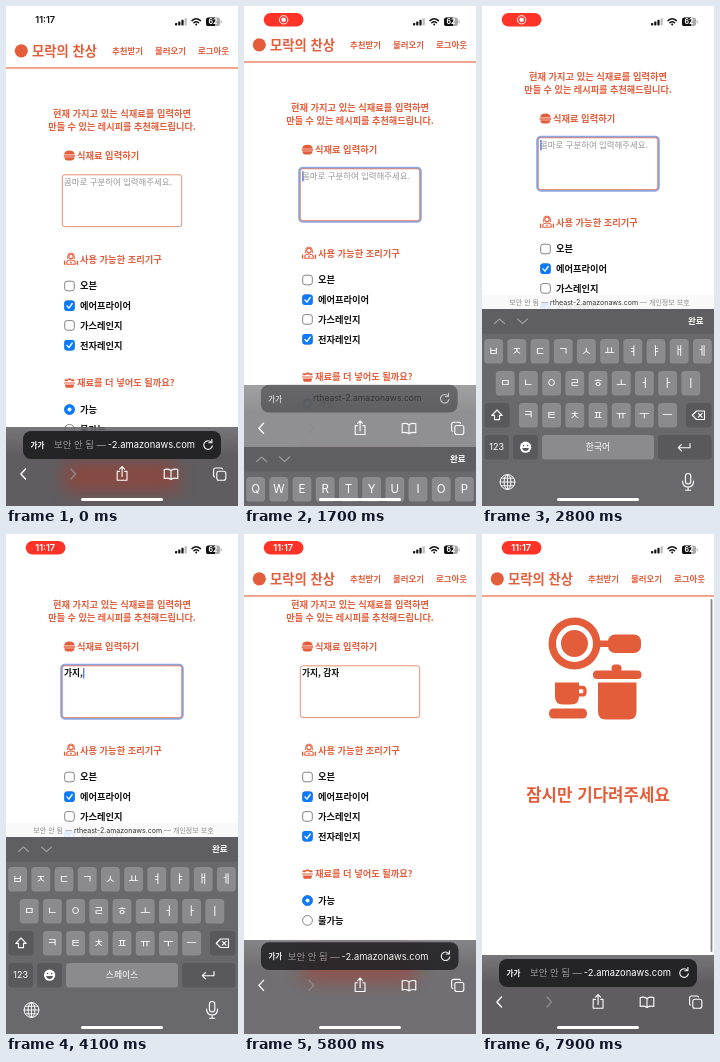
Write an HTML page that moves like this. It is 232 px wide and 500 px high and loops after 8 s.

```html
<!DOCTYPE html>
<html lang="ko">
<head>
<meta charset="utf-8">
<title>Recipe app</title>
<style>
  html, body { margin: 0; width: 100%; height: 100%; overflow: hidden; background: #fff; }
  svg { display: block; width: 232px; height: 500px; }
  text { font-family: "Noto Sans CJK KR", "Noto Sans CJK", sans-serif; white-space: pre; }
  .ui { font-family: Inter, "Noto Sans CJK KR", "Noto Sans CJK", sans-serif; }
</style>
</head>
<body>
<svg id="stage" viewBox="0 0 232 500" xmlns="http://www.w3.org/2000/svg"></svg>
<script>
const LOOP = 8000;
const ORANGE = '#e45d3b', BLUE = '#0a7aff';

// Markup helpers; text is placed by its vertical centre.
const text = (s, x, y, size, fill, extra = '') =>
  `<text x="${x}" y="${y + size * 0.36}" font-size="${size}" fill="${fill}" ${extra}>${s}</text>`;
const rect = (x, y, w, h, r, fill, extra = '') =>
  `<rect x="${x}" y="${y}" width="${w}" height="${h}" rx="${r}" fill="${fill}" ${extra}/>`;
const circle = (x, y, r, fill, extra = '') =>
  `<circle cx="${x}" cy="${y}" r="${r}" fill="${fill}" ${extra}/>`;
const line = (d, color, width = 1, extra = '') =>
  `<path d="${d}" fill="none" stroke="${color}" stroke-width="${width}" stroke-linecap="round" stroke-linejoin="round" ${extra}/>`;
const shape = (d, fill) => `<path d="${d}" fill="${fill}"/>`;
const group = (id, body, extra = '') => `<g id="${id}" ${extra}>${body}</g>`;
const BOLD = 'font-weight="700"', BLACK = 'font-weight="900"';
const MID = 'text-anchor="middle"', UI = 'class="ui"';

function statusBar() {
  const bars = [0, 1, 2, 3].map(i =>
    rect(169 + i * 3.2, 17 - i * 1.6, 2.2, 2.4 + i * 1.6, 0.6, i < 3 ? '#111' : '#bbb')).join('');
  const wifi = line('M186 14.6q4.2-3.8 8.4 0', '#111', 1.5) +
    line('M187.8 16.8q2.4-2 4.8 0', '#111', 1.4) + circle(190.2, 18.6, 1, '#111');
  const battery = rect(200, 11.5, 14, 8.5, 2.6, '#a9a9ab') +
    shape('M202.6 11.5h6.4v8.5h-6.4a2.6 2.6 0 0 1-2.6-2.6v-3.3a2.6 2.6 0 0 1 2.6-2.6z', '#111') +
    rect(214.6, 14.3, 1, 3, 0.5, '#a9a9ab') +
    text('62', 207, 15.8, 7, '#fff', `${BOLD} ${MID} ${UI}`);
  const rec = circle(39.6, 13.8, 4.2, 'none', 'stroke="#fff" stroke-width="1"') + circle(39.6, 13.8, 2.3, '#fff');
  return bars + wifi + battery +
    group('pill', rect(-19.9, -6.8, 39.8, 13.6, 6.8, '#ff3327')) +
    group('rec', rec) + text('11:17', 39.2, 14.1, 9.2, '#111', `id="clock" ${MID} ${UI} font-weight="600"`);
}

function header() {
  const nav = ['추천받기', '불러오기', '로그아웃'].map((s, i) =>
    text(s, 106 + i * 43, 44.5, 8.45, ORANGE, BOLD)).join('');
  return rect(0, 0, 232, 62, 0, '#fff') + circle(15.3, 44.8, 6.6, ORANGE) +
    text('모락의 찬상', 26, 45, 13.3, ORANGE, BLACK) + nav + rect(0, 61.4, 232, 1.1, 0, ORANGE);
}

const bowlIcon = shape('M58 148.6q.6-4 5.4-4t5.4 4z', ORANGE) + rect(57.5, 149.2, 11.8, 1.5, 0.7, ORANGE) +
  shape('M58.3 151.2h10.2q-.6 3.2-3 3.2h-4.2q-2.4 0-3-3.2z', ORANGE);
const cookIcon = circle(65, 250.4, 2.2, 'none', `stroke="${ORANGE}" stroke-width="1.1"`) +
  line('M61.6 252.8v-2.4a3.4 3.4 0 0 1 6.8 0v2.4', ORANGE, 0.9) +
  line('M60.8 258.2v-1.8q.4-2.4 4.2-2.4t4.2 2.4v1.8z', ORANGE, 1.1) +
  line('M58.6 258.2v-3M71.4 258.2v-3', ORANGE, 1.4) + circle(65, 256.4, 0.9, ORANGE);
const basketIcon = line('M59.5 374.2h1.6M62.7 373.4h1.8M66 374.2h1.6', ORANGE, 1.9) +
  line('M58.4 377h10.2', ORANGE, 1.1) + shape('M58.8 378.5h9.4l-1 3.2h-7.4z', ORANGE);

function option(label, y, id, radio) {
  const box = radio ? circle(63.5, y, 4.9, '#fff', 'stroke="#777" stroke-width=".9"')
    : rect(58.7, y - 4.8, 9.6, 9.6, 2.4, '#fff', 'stroke="#777" stroke-width=".9"');
  const on = radio ? circle(63.5, y, 5.3, BLUE) + circle(63.5, y, 2, '#fff')
    : rect(58.3, y - 5.2, 10.4, 10.4, 2.6, BLUE) + line(`M61 ${y + 0.2}l1.9 2.2 3.3-4.6`, '#fff', 1.4);
  return box + (id ? group(id, on) : '') + text(label, 74, y, 9.25, '#111', BLACK);
}

function form() {
  const title = (s, x, y) => text(s, x, y, 9.25, ORANGE, BOLD);
  return text('현재 가지고 있는 식재료를 입력하면', 116, 108, 9.25, ORANGE, `${BOLD} ${MID}`) +
    text('만들 수 있는 레시피를 추천해드립니다.', 116, 121, 9.15, ORANGE, `${BOLD} ${MID}`) +
    bowlIcon + title('식재료 입력하기', 71, 150) +
    rect(55.3, 167.8, 121.4, 53.8, 3.5, 'none', 'id="ring" stroke="#8aa9e2" stroke-width="2.2"') +
    rect(56.3, 168.8, 119.4, 51.8, 2.5, '#fff', `stroke="${ORANGE}" stroke-width=".7"`) +
    text('콤마로 구분하여 입력해주세요.', 58, 176, 8.45, '#999', 'id="hint" font-weight="500"') +
    text('', 58, 176, 8.7, '#111', `id="typed" ${BOLD}`) +
    rect(0, 171, 1.2, 10.5, 0.6, '#3d6fd8', 'id="caret"') +
    cookIcon + title('사용 가능한 조리기구', 74, 254) +
    option('오븐', 280) + option('에어프라이어', 299.7, 'check1') +
    option('가스레인지', 319.4) + option('전자레인지', 339.2, 'check2') +
    basketIcon + title('재료를 더 넣어도 될까요?', 71, 377) +
    option('가능', 403.5, 'radio', true) + option('불가능', 423.4, '', true) +
    rect(58, 456, 115.5, 30, 2.5, ORANGE) + text('추천받기', 116, 469, 9.25, '#fff', `${BOLD} ${MID}`);
}

function waiting() {
  const pan = circle(92.5, 109.5, 26, ORANGE) + circle(92.5, 109.5, 16, ORANGE, 'stroke="#fff" stroke-width="5"') +
    rect(114, 106.5, 18, 6.5, 1, ORANGE) + rect(126, 100.5, 33, 18.5, 7, ORANGE);
  const cup = shape('M73 148.5h24v14q0 8-8 8h-8q-8 0-8-8z', ORANGE) +
    line('M97 153.5h3.4q2.6 0 2.6 3v1.4q0 3-2.6 3H97', ORANGE, 3.4) + rect(67, 174.5, 38, 10, 4.5, ORANGE);
  const pot = rect(129.5, 130.5, 10, 8, 3.5, ORANGE) + rect(111, 136.5, 48.5, 8.5, 4, ORANGE) +
    shape('M116 148.5h38.5v29q0 8-8 8H124q-8 0-8-8z', ORANGE);
  return rect(0, 62, 232, 360, 0, '#fff') + pan + cup + pot +
    text('잠시만 기다려주세요', 116, 261, 16.8, ORANGE, `${BOLD} ${MID}`);
}

// Toolbar parts are drawn around their own origin.
const pillBar = () =>
  rect(17, -14, 198, 28, 8, '#242326') +
  text('가가', 24.5, 0.3, 7.5, '#fff', BOLD) +
  group('address', text('보안 안 됨 —', 48, 0, 9.4, '#9b9a9e', UI) +
    text('-2.amazonaws.com', 189, 0, 9.4, '#fff', `${UI} text-anchor="end"`)) +
  line('M205.4-2.6a4.3 4.3 0 1 0 .9 3.4', '#fff', 1.1) + line('M205.9-5.4v3.2h-3.2', '#fff', 1.1);

const buttons = () =>
  line('M19.5-5l-4.6 5 4.6 5', '#fff', 1.4) + line('M65-5l4.6 5L65 5', '#8c8a8f', 1.4) +
  line('M113.4-2.6h-2.2v8.8h9.8v-8.8h-2.2M116.1 2.4v-9.6M113.6-4.8l2.5-2.6 2.5 2.6', '#fff', 1.1) +
  line('M165 5.5q-3-2-6.8-1v-9q3.8-1 6.8 1 3-2 6.8-1v9q-3.8-1-6.8 1v-9', '#fff', 1.1) +
  rect(210.8, -2.8, 9, 9, 2, 'none', 'stroke="#fff" stroke-width="1.1"') +
  line('M208.6 3q-1-.3-1-1.6v-5.4q0-2 2-2h5.2q1.4 0 1.7 1', '#fff', 1.1);

// The bare address rides along while the pill dissolves; its captions follow.
const strip = () =>
  text('보안 안 됨 —', -50, 0, 7, '#8d8d91', `${UI} text-anchor="end" class="caption"`) +
  text('rtheast-2.amazonaws.com', -4, 0, 7, '#333', `${UI} ${MID}`) +
  text('— 개인정보 보호', 42, 0, 7, '#8d8d91', UI);

const KEY = '#8b8a8e', FN = '#59585c';
function keyRow(chars, y, pitch = 23.2, w = 18.9) {
  return [...chars].map((c, i, all) => {
    const x = 116 + (i - (all.length - 1) / 2) * pitch;
    const label = c === '&' ? '&amp;' : c;
    return rect(x - w / 2, y, w, 24.5, 3.6, KEY) + text(label, x, y + 12, 11.5, '#fff', `${MID} ${UI}`);
  }).join('');
}

function keyboard() {
  const layer = (id, a, b, c, wide) =>
    group(id, keyRow(a, 333) + keyRow(b, 365) + (wide ? keyRow(c, 397, 32.5, 28) : keyRow(c, 397)));
  const fn = (x, y, w) => rect(x, y, w, 24.5, 3.6, FN);
  const face = circle(43.6, 441.2, 5.6, '#fff') + circle(41.6, 439.6, 0.8, FN) + circle(45.6, 439.6, 0.8, FN) +
    shape('M40.2 442h6.8q-.6 3-3.4 3t-3.4-3z', FN);
  const globe = circle(25.5, 476, 7.4, 'none', 'stroke="#fff"') +
    '<ellipse cx="25.5" cy="476" rx="3.4" ry="7.4" fill="none" stroke="#fff"/>' +
    line('M18.1 476h14.8M25.5 468.6v14.8M19.5 472.2h12M19.5 479.8h12', '#fff', 0.9);
  const mic = rect(203.4, 467.5, 5.4, 10.5, 2.7, 'none', 'stroke="#fff" stroke-width="1.1"') +
    line('M200.6 475q0 6 5.5 6t5.5-6M206.1 481v3.3M203.5 484.3h5.2', '#fff', 1.1);
  return rect(0, 303, 232, 200, 0, '#69686c') + rect(0, 303, 232, 24.5, 0, '#5f5e62') +
    line('M12.5 317.5l5-4.5 5 4.5', '#99989c', 1.3) + line('M35.5 313l5 4.5 5-4.5', '#99989c', 1.3) +
    text('완료', 206, 315, 8.5, '#fff', BOLD) +
    layer('en', 'QWERTYUIOP', 'ASDFGHJKL', 'ZXCVBNM') +
    layer('ko', 'ㅂㅈㄷㄱㅅㅛㅕㅑㅐㅔ', 'ㅁㄴㅇㄹㅎㅗㅓㅏㅣ', 'ㅋㅌㅊㅍㅠㅜㅡ') +
    layer('sym', '1234567890', '-/:;()₩&@"', '.,?!\'', true) +
    fn(2.5, 397, 25) + fn(204, 397, 25.5) + fn(2.5, 429, 24.5) + fn(31, 429, 25) + fn(176, 429, 53.5) +
    line('M15 404l5.2 5.4h-2.7v4.2h-5v-4.2H9.8z', '#fff', 1.1) +
    line('M214.5 405h8v8.5h-8l-4.2-4.25zM216.3 407.3l3.8 3.9M220.1 407.3l-3.8 3.9', '#fff', 1.1) +
    text('123', 14.7, 441, 9, '#fff', `id="mode" ${MID} ${UI}`) + face +
    rect(60, 429, 112, 24.5, 3.6, KEY) + text('', 116, 441, 8.8, '#fff', `id="space" ${MID} ${UI}`) +
    line('M208 437.5v4.2h-11.5M199.5 438.5l-3.2 3.2 3.2 3.2', '#fff', 1.1) + globe + mic;
}

document.getElementById('stage').innerHTML =
  `<defs><filter id="soft" x="-50%" y="-100%" width="200%" height="300%"><feGaussianBlur stdDeviation="8"/></filter>
  <linearGradient id="shade" x1="0" y1="0" x2="0" y2="1">
  <stop offset="0" stop-color="#d8d8d8"/><stop offset=".12" stop-color="#fff"/></linearGradient>
  <mask id="veil" maskUnits="userSpaceOnUse" x="0" y="0" width="232" height="230">
  <rect width="232" height="230" fill="url(#shade)"/></mask>
  <clipPath id="cut"><rect width="232" height="230"/></clipPath></defs>` +
  rect(0, 0, 232, 500, 0, '#fff') + group('form', form()) + group('waiting', waiting()) +
  group('header', header()) + rect(228.6, 0, 1.8, 0, 0.9, '#88888b', 'id="bar"') + statusBar() +
  group('panel', rect(0, 0, 232, 230, 0, '#5f5d61', 'id="tint" mask="url(#veil)"') +
    `<g clip-path="url(#cut)">${rect(58, 0, 115, 30, 4, '#b8301c', 'id="glow" filter="url(#soft)"')}</g>`) +
  group('pillBar', pillBar()) + group('buttons', buttons()) + group('strip', strip()) +
  group('keyboard', keyboard()) + rect(75, 492, 82, 3, 1.5, '#fff');

const el = {};
document.querySelectorAll('[id]').forEach(n => { el[n.id] = n; });
const captions = [el.strip.firstChild, el.strip.lastChild];

const clamp = v => Math.max(0, Math.min(1, v));
const ramp = (v, a, b) => clamp((v - a) / (b - a));
const ease = (t, a, b) => { const k = ramp(t, a, b); return k * k * (3 - 2 * k); };
const mix = (a, b, k) => a + (b - a) * k;
const show = (n, on) => { n.style.display = on ? '' : 'none'; };
const move = (n, x, y, scale = 1) => n.setAttribute('transform', `translate(${x} ${y}) scale(${scale})`);
const fade = (n, v) => n.setAttribute('opacity', v);
const label = (n, s) => { if (n.textContent !== s) n.textContent = s; };

const TYPING = [[3050, 'ㄱ'], [3200, '가'], [3350, '갖'], [3500, '가지'], [3850, '가지,'], [4250, '가지, '],
  [4350, '가지, ㄱ'], [4480, '가지, 가'], [4620, '가지, 감'], [4800, '가지, 감ㅈ'], [4950, '가지, 감자']];

function draw(t) {
  const p = t < 4000 ? ease(t, 1550, 1950) : 1 - ease(t, 5486, 5886);
  const opening = t < 4000;
  const done = t >= 7380;
  const scroll = opening ? 37 * Math.pow(p, 1.6) : mix(37, 45.3, ease(t, 6550, 6850));

  // Status pill
  const grow = ease(t, 550, 750), timed = t < 550 || t >= 3500;
  move(el.pill, 39.6, 13.8, grow);
  show(el.rec, !timed);
  show(el.clock, timed);
  el.clock.setAttribute('fill', t < 550 ? '#111' : '#fff');

  // Page: the header is pushed up with the page while the keyboard opens
  show(el.form, !done);
  show(el.waiting, done);
  move(el.form, 0, -scroll);
  move(el.header, 0, opening ? -scroll : 0);
  fade(el.header, 1 - ramp(p, 0.35, 0.7));
  const barTop = done ? 65 : 60;
  show(el.bar, t >= 6550);
  el.bar.setAttribute('y', barTop);
  el.bar.setAttribute('height', (done ? 418 : 401) - barTop);

  // Text field
  const step = TYPING.filter(s => s[0] <= t).pop();
  const focus = t >= 1500 && t < 5500;
  label(el.typed, step ? step[1] : '');
  show(el.hint, !step);
  show(el.ring, focus);
  const since = t - (step ? step[0] : 1500);
  show(el.caret, focus && since % 1100 < 600);
  el.caret.setAttribute('x', 58.3 + (step && !done ? el.typed.getComputedTextLength() : 0));

  // Browser bar
  const top = mix(421, 289, p);
  const shade = k => Math.round(mix(k, 248, p));
  move(el.panel, 0, top);
  el.tint.setAttribute('fill', `rgb(${shade(95)},${shade(93)},${shade(97)})`);
  el.glow.setAttribute('y', 456 - scroll - top);
  fade(el.glow, done ? 0 : 0.45 * (1 - p));
  move(el.pillBar, 0, top + mix(18, 5, p), mix(1, 0.98, p));
  fade(el.pillBar, clamp(1.15 - 2.2 * p));
  move(el.address, -35 * p, 0);
  fade(el.address, 1 - ramp(p, 0.14, 0.3));
  move(el.buttons, 0, top + mix(47, 36, p));
  fade(el.buttons, 1 - ramp(p, 0.3, 0.75));
  move(el.strip, mix(134, 116, p), top + mix(16, 7, p), mix(1.34, 1, p));
  fade(el.strip, ramp(p, 0.15, 0.33));
  captions.forEach(n => fade(n, ramp(p, 0.5, 0.9)));

  // Keyboard
  const symbols = t >= 3680 && t < 3980;
  move(el.keyboard, 0, 203 * (1 - p));
  show(el.keyboard, p > 0);
  fade(el.keyboard, opening ? 1 : ramp(p, 0.13, 0.35));
  show(el.en, t < 2400);
  show(el.ko, t >= 2400 && !symbols);
  show(el.sym, symbols);
  label(el.mode, symbols ? '한글' : '123');
  label(el.space, t < 2400 ? 'space' : t < 3100 ? '한국어' : '스페이스');
}

const start = performance.now();
function tick() {
  draw((performance.now() - start) % LOOP);
  requestAnimationFrame(tick);
}
tick();
</script>
</body>
</html>
```
